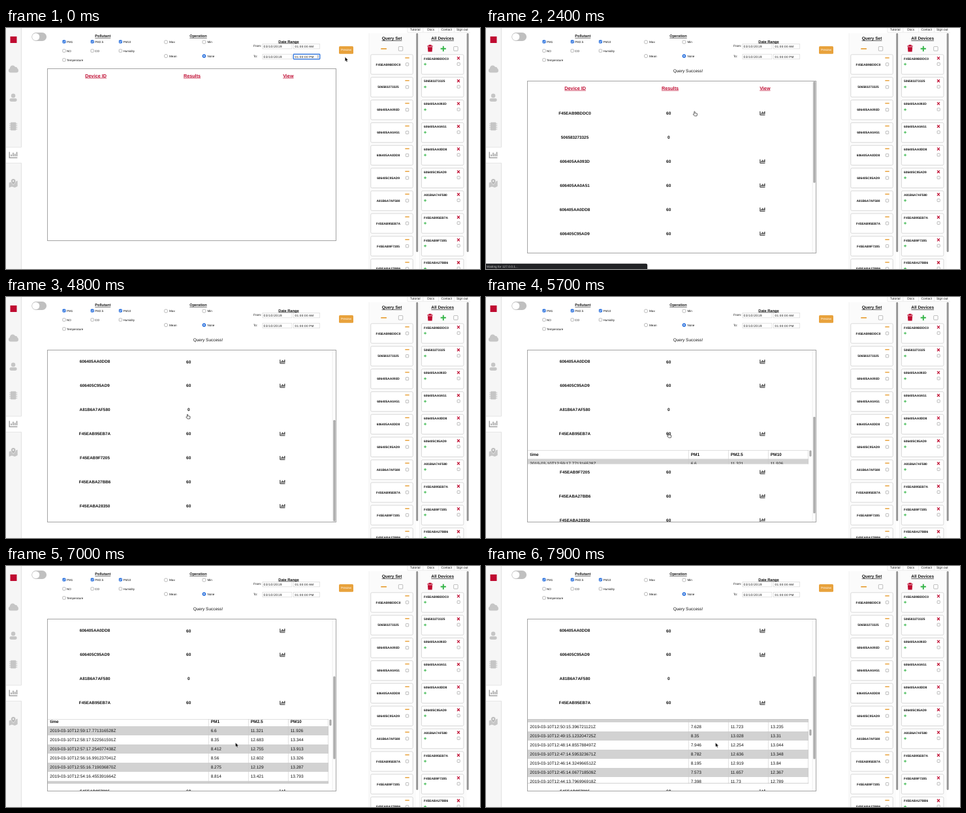
Write an HTML page that moves like this. It is 726 px wide and 370 px high and loops after 8 s.

```html
<!DOCTYPE html>
<html lang="en">
<head>
<meta charset="utf-8">
<title>Device query</title>
<style>
  html, body { margin: 0; width: 100%; height: 100%; overflow: hidden; background: #fff; }
  svg { display: block; width: 726px; height: 370px; }
  text { font-family: "Liberation Sans", Arial, sans-serif; text-rendering: geometricPrecision; white-space: pre; }
  .b { font-weight: bold; }
  .u { text-decoration: underline; }
</style>
</head>
<body>
<svg viewBox="0 0 726 370" xmlns="http://www.w3.org/2000/svg">
  <defs>
    <clipPath id="viewClip"><rect x="64" y="63" width="441" height="263"/></clipPath>
    <clipPath id="panelClip"><rect id="panelMask" x="64" width="436" height="0"/></clipPath>
    <g id="bars"></g>
  </defs>
  <g id="page"></g>
  <g id="focus">
    <rect x="440.3" y="40.3" width="40.4" height="7.4" rx=".6" fill="none" stroke="#3f7fe0" stroke-width="1.5"/>
    <path d="M476.8 43.4l1.1-1.6 1.1 1.6zm0 1.3l1.1 1.6 1.1-1.6z" fill="#666"/>
  </g>
  <g id="box">
    <rect x="63.5" y="62.5" width="442" height="264" fill="#fff" stroke="#a3a3a3"/>
    <g clip-path="url(#viewClip)">
      <g id="blank"></g>
      <g id="results">
        <g id="content">
          <g id="above"></g>
          <g id="panel" clip-path="url(#panelClip)"><g id="table"></g><rect id="innerThumb" x="495.3" width="3.2" height="9.5" rx="1.4" fill="#ababab"/></g>
          <g id="below"></g>
        </g>
        <path d="M500.2 63V326" stroke="#e9e9e9" stroke-width=".8"/>
        <rect id="thumb" x="501.3" width="3.2" rx="1.5" fill="#a9a9a9"/>
      </g>
    </g>
  </g>
  <g id="success"></g>
  <g id="status"><path d="M0 361.8H245q2.2 0 2.2 2.2V370H0z" fill="#222326"/></g>
  <path id="arrow" d="M0 0V6.6L1.5 5.3 2.6 7.6 3.9 7 2.8 4.8 4.9 4.7z" stroke="#fff" stroke-width=".5"/>
  <path id="hand" d="M-.6.5Q0-.4.7.5V2.6L4 3.3V5L3.5 7H-.1L-2.1 4.5Q-1.8 3.4-.6 4.3z" fill="#fff" stroke="#222" stroke-width=".7"/>
</svg>
<script>
const LOOP = 8000, FRAME = 100;
const ROW = 36.95, PANEL_TOP = 395.3, VIEW_TOP = 63, VIEW = 263, SCROLLED = 179.4;
const PANEL = 99, LINE = 14, READINGS = 60, SHIFT = 19;
const RED = '#bf0a30', ORANGE = '#e8a23c', GREEN = '#35b548', BLUE = '#2f74de', ICON = '#c6c6c6';
const $ = id => document.getElementById(id);

const devices = ['F45EAB9BDDC0', '506583273325', '606405AA093D', '606405AA0A51', '606405AA0DD8', '606405C95AD9',
  'A81B6A7AF580', 'F45EAB95EB7A', 'F45EAB9F7205', 'F45EABA27BB6', 'F45EABA28350'];
const silent = ['506583273325', 'A81B6A7AF580'];
const opened = devices.indexOf('F45EAB95EB7A');

const set = (el, attrs) => { for (const k in attrs) el.setAttribute(k, attrs[k]); };
function add(parent, tag, attrs, content) {
  const el = document.createElementNS('http://www.w3.org/2000/svg', tag);
  set(el, attrs);
  if (content) el.textContent = content;
  parent.append(el);
  return el;
}
// y is the middle of the capitals
const text = (p, s, x, y, size, opts) =>
  add(p, 'text', { x, y: y + size * .36, 'font-size': size, fill: '#111', ...opts }, s);
const middle = { 'text-anchor': 'middle' };
const bold = { class: 'b' };
const title = { class: 'b u', ...middle };
const rect = (p, x, y, width, height, fill, opts) => add(p, 'rect', { x, y, width, height, fill, ...opts });
const circle = (p, cx, cy, r, fill, opts) => add(p, 'circle', { cx, cy, r, fill, ...opts });
const line = (p, d, stroke, width) => add(p, 'path', { d, fill: 'none', stroke, 'stroke-width': width });
const edge = on => ({ stroke: on ? BLUE : '#8f8f8f', 'stroke-width': .6 });

function check(p, x, y, size, on) {
  rect(p, x - size / 2, y - size / 2, size, size, on ? BLUE : '#fff', { rx: .8, ...edge(on) });
  if (on) line(p, `M${x - 1.4} ${y}l1 1.1 1.8-2.3`, '#fff', .8);
}
function radio(p, x, y, on) {
  circle(p, x, y, 2.6, on ? BLUE : '#fff', edge(on));
  if (on) circle(p, x, y, 1, '#fff');
}
const plus = (p, x, y, r, w) => line(p, `M${x - r} ${y}h${2 * r}m${-r} ${-r}v${2 * r}`, GREEN, w);

// a small bar chart: two axes and four bars, s is the scale
function chart(p, x, y, s, color) {
  line(p, `M${x - 3.7 * s} ${y - 3 * s}v${5.7 * s}h${7.6 * s}`, color, .9 * s);
  [1.7, 3.5, 2.5, 4.2].forEach((h, i) =>
    line(p, `M${x + (i * 1.75 - 1.9) * s} ${y + 1.3 * s}v${-h * s}`, color, 1.05 * s));
}

function sidebar(p) {
  rect(p, 0, 0, 23.5, 370, '#f6f6f6');
  line(p, 'M23.5 0V183.2H0M0 207.2H23.5V370', '#dcdcdc', .8);
  rect(p, 0, 183.6, 24.2, 23.2, '#fff');
  rect(p, 6.5, 13, 10, 10, RED);
  rect(p, 4, 62, 15, 6.4, ICON, { rx: 3.2 });
  circle(p, 10.2, 61.7, 4.3, ICON);
  circle(p, 14.6, 62.6, 2.8, ICON);
  circle(p, 11.1, 104, 3.2, ICON);
  rect(p, 5.5, 108, 11.2, 5, ICON, { rx: 2.4 });
  rect(p, 7, 144.8, 8.4, 12.4, ICON, { rx: 1 });
  for (let y = 147; y < 157; y += 2.7) line(p, `M5 ${y}h12.4`, ICON, 1);
  chart(p, 11.2, 195, 1.6, '#a2a2a2');
  add(p, 'path', { d: 'M4.7 237.5l4-1.5h5l4-1.5V243l-4.2 2-4.5-1.5-4.3 1.6z', fill: ICON });
  add(p, 'path', { d: 'M11.2 241q-3.6-4.2-3.6-6a3.6 3.6 0 0 1 7.2 0q0 1.8-3.6 6z', fill: '#b9b9b9', stroke: '#f6f6f6', 'stroke-width': .6 });
  circle(p, 11.2, 235, 1.2, '#f6f6f6');
}

function form(p) {
  rect(p, 39.3, 7, 22.8, 13, '#c0c0c0', { rx: 6.5 });
  circle(p, 45.7, 13.5, 5.6, '#fff');

  text(p, 'Pollutant', 148.3, 12, 5.6, title);
  text(p, 'Operation', 294.5, 12, 5.6, title);
  text(p, 'Date Range', 433, 20.5, 5.7, title);
  [['PM1', 'NO', 'Temperature'], ['PM2.5', 'CO'], ['PM10', 'Humidity']].forEach((col, c) =>
    col.forEach((label, r) => {
      const x = 89 + c * 43.2, y = 21 + r * 14;
      check(p, x, y, 4.4, r === 0);
      text(p, label, x + 4, y + .5, 4.5);
    }));
  [['Max', 'Min'], ['Mean', 'None']].forEach((row, r) => row.forEach((label, c) => {
    const x = 245 + c * 58.4, y = 21.5 + r * 21.5;
    radio(p, x, y, label === 'None');
    text(p, label, x + 5, y + .3, 4.6);
  }));
  [['From:', 'AM'], ['To:', 'PM']].forEach(([label, half], r) => {
    const y = 28.1 + r * 15.9, field = { stroke: '#cfcfcf', 'stroke-width': .6 };
    text(p, label, 379, y - 1, 4.7);
    rect(p, 393, y - 3.8, 45, 7.6, '#fff', field);
    rect(p, 440.3, y - 3.8, 40.4, 7.6, '#fff', field);
    text(p, '03/10/2019', 394.6, y, 4.8, { 'letter-spacing': .42 });
    text(p, `01:00:00 ${half}`, 442.6, y, 4.6, { 'letter-spacing': .28 });
  });
  rect(p, 510, 28, 22, 11.7, ORANGE, { rx: 1.5, id: 'preview' });
  text(p, 'Preview', 521, 33.8, 4.5, { ...middle, fill: '#fff' });
}

function deviceLists(p) {
  ['Tutorial', 'Docs', 'Contact', 'Sign out'].forEach((s, i) => {
    text(p, s, 626.6 + i * 24.1, 1.9, 4.8, middle);
    line(p, `M${615 + i * 23.8} 0v6.5`, '#d9d9d9', .6);
  });
  line(p, 'M615 6.8H711', '#d9d9d9', .6);
  for (const x of [556, 633.5]) {
    rect(p, x, 8, 72, 362, '#fbfbfb');
    line(p, `M${x} 8V370`, '#ececec', .7);
    rect(p, x + 72.2, 8, 3, 336, '#959595', { rx: 1.4 });
  }

  text(p, 'Query Set', 591, 16, 6.5, title);
  text(p, 'All Devices', 668.7, 16, 6.5, title);
  rect(p, 574.2, 31, 8.8, 1.7, ORANGE, { rx: .5 });
  check(p, 604.5, 31.8, 6.4);
  line(p, 'M645.3 27.9h8.4M648 27.3v-.8h3v.8', RED, 1.3);
  add(p, 'path', { d: 'M645.9 29.2h7.2l-.5 7.2h-6.2z', fill: RED });
  plus(p, 669.8, 31.8, 4.1, 1.9);
  check(p, 688.9, 31.8, 6.4);

  const card = (x, y) => rect(p, x, y - 15, 64.5, 30.3, '#fff', { rx: 1.8, stroke: '#c9c9c9', 'stroke-width': .7 });
  devices.slice(0, 10).forEach((id, i) => {
    const y = 55.8 + i * 34.87;
    card(558.7, y);
    text(p, id, 585.5, y, 4.85, { ...bold, ...middle });
    rect(p, 611.3, y - 10.7, 6.4, 1.5, ORANGE);
    check(p, 614.5, y, 4.4);
    card(636.4, y);
    text(p, id, 640, y - 9, 4.85, bold);
    plus(p, 642, y - .2, 2, 1);
    line(p, `M691 ${y - 11.6}l4 4.2m0-4.2l-4 4.2`, RED, 1.2);
    check(p, 693.2, y - .5, 4.2);
  });
}

function headings(p, width) {
  ['Device ID', 'Results', 'View'].forEach((s, i) =>
    text(p, s, 64 + width * (i + .5) / 3, 73, 7.25, { ...title, fill: RED }));
}

function resultRows() {
  headings($('above'), 436);
  chart($('bars'), 0, 0, 1, '#111');
  devices.forEach((id, i) => {
    const p = $(i > opened ? 'below' : 'above'), y = 111.8 + i * ROW, none = silent.includes(id);
    text(p, id, 136, y, 6.35, { ...bold, ...middle });
    text(p, none ? '0' : '60', 279.7, y, 6.5, { ...bold, ...middle });
    if (!none) add(p, 'use', { href: '#bars', x: 423.5, y });
  });
}

let seed = 7;
const random = () => (seed = seed * 16807 % 2147483647) / 2147483647;
const vary = (base, spread) => base + (random() - .5) * spread;
const short = v => String(+v.toFixed(3));

// one reading per minute, newest first, each a little earlier in its minute
function reading(i) {
  const pm1 = vary(7.8, 2.4), pm25 = pm1 + vary(4.3, 1), pm10 = pm25 + vary(.9, 1.4);
  const minute = String(READINGS - 1 - i).padStart(2, '0');
  const second = vary(17.78 - i * .265, .03).toFixed(9).padStart(12, '0');
  return [`2019-03-10T12:${minute}:${second}Z`, short(pm1), short(pm25), short(pm10)];
}

function readingTable(p) {
  const column = c => c ? 249.4 + c * 61 : 64;
  const cells = (row, y, opts) => row.forEach((s, c) => text(p, s, column(c) + 3.3, y + 6.5, 6.52, opts));
  cells(['time', 'PM1', 'PM2.5', 'PM10'], PANEL_TOP, bold);
  for (let i = 0; i < READINGS; i++) {
    const y = PANEL_TOP + LINE * (i + 1);
    if (i % 2 === 0) rect(p, 64, y - .4, 430, LINE, '#d2d2d2');
    cells(reading(i), y);
  }
  for (let c = 1; c <= 4; c++)
    line(p, `M${Math.min(column(c), 494)} ${PANEL_TOP}v${LINE * (READINGS + 1)}`, '#c9c9c9', .6);
  line($('panel'), `M64 ${PANEL_TOP + .3}H494m-430 ${PANEL - .7}H494`, '#b5b5b5', .6);
}

// eased progress from 0 to 1 between two times
function ease(t, from, to) {
  const p = Math.min(1, Math.max(0, (t - from) / (to - from)));
  return p * p * (3 - 2 * p);
}

// pointer moves: from, to, then the place reached
const moves = [[300, 700, 520.5, 32.5], [1400, 2300, 319.4, 128], [2850, 3300, 281.6, 139], [3850, 4500, 283, 190],
  [4500, 4800, 278, 180], [4800, 5300, 279.7, 209], [5700, 6400, 352.8, 251.2], [6700, 7000, 351.4, 271.2]];
function pointer(t) {
  let x = 519.2, y = 44.6;
  for (const [from, to, nx, ny] of moves) {
    const p = ease(t, from, to);
    x += (nx - x) * p;
    y += (ny - y) * p;
  }
  return [x, y];
}

const show = (id, on) => set($(id), { display: on ? 'inline' : 'none' });
const place = (id, x, y) => set($(id), { transform: `translate(${x} ${y})` });
const within = (t, from, to) => t >= from && t < to;

function draw(t) {
  const loaded = t >= 1500;
  show('focus', t < 900);
  set($('preview'), { fill: within(t, 900, 1100) ? '#d8912b' : ORANGE });
  show('blank', !loaded);
  show('results', loaded);
  show('success', loaded);
  show('status', within(t, 1300, 2800));
  place('box', 0, loaded ? SHIFT : 0);

  const top = SCROLLED * ease(t, 3400, 3700);
  const open = PANEL * ease(t, 5570, 6000);
  const inner = 24 * ease(t, 6900, 7400) + 110.5 * ease(t, 7800, 7900);
  const full = VIEW + SCROLLED + open;
  place('content', 0, -top);
  place('below', 0, open);
  set($('panelMask'), { y: PANEL_TOP, height: open });
  place('table', 0, -inner);
  set($('innerThumb'), { y: PANEL_TOP + .5 + inner * PANEL / (LINE * (READINGS + 1)) });
  set($('thumb'), { y: VIEW_TOP + top * VIEW / full, height: VIEW * VIEW / full - .5 });

  const hand = within(t, 600, 1500) || within(t, 2200, 5900);
  show('hand', hand);
  show('arrow', !hand);
  place(hand ? 'hand' : 'arrow', ...pointer(t));
}

sidebar($('page'));
form($('page'));
deviceLists($('page'));
headings($('blank'), 442);
resultRows();
readingTable($('table'));
text($('success'), 'Query Success!', 309.5, 66, 6.45, middle);
text($('status'), 'Waiting for 127.0.0.1...', 1, 366, 4.77, { fill: '#c9c9c9' });

const start = performance.now();
function tick() {
  const t = (performance.now() - start) % LOOP;
  draw(Math.floor(t / FRAME) * FRAME);
  requestAnimationFrame(tick);
}
tick();
</script>
</body>
</html>
```
